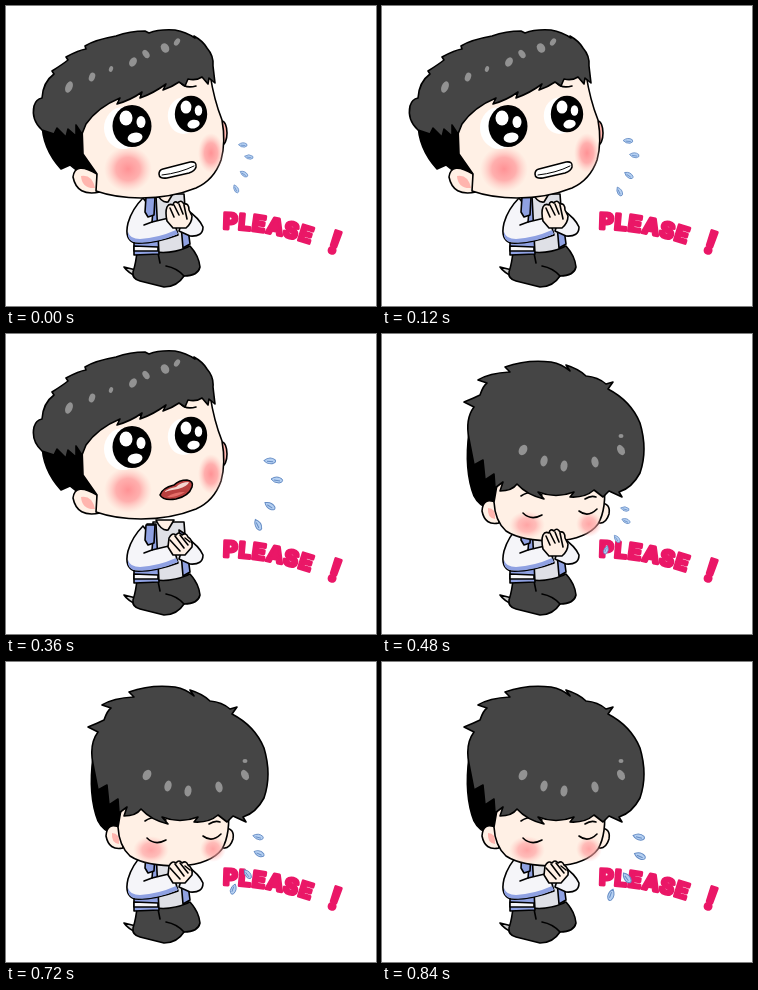
An HTML page that plays this animation: 370 by 300 pixels, repeating every 960 ms.

```html
<!DOCTYPE html>
<html lang="en">
<head>
<meta charset="utf-8">
<title>Please!</title>
<style>
  html, body { margin: 0; width: 100%; height: 100%; overflow: hidden; background: #fff; }
  svg { display: block; width: 100vw; height: 100vh; }
  .ink { stroke: #000; stroke-width: 1.6; stroke-linejoin: round; stroke-linecap: round; }
  .line { fill: none; }
  .skin { fill: #fff0e5; }
  .hair { fill: #454545; }
  .white { fill: #f5f5f9; }
  .blue { fill: #8fa1e2; }
  .shine { fill: #929292; }
  .drop { fill: #b5d0f2; stroke: #668dc5; stroke-width: 1; }
  text { font: 800 22px Inter, "Open Sans", sans-serif; fill: #ea1767; stroke: #ea1767; stroke-width: 3; stroke-linejoin: round; }
</style>
</head>
<body>
<svg viewBox="0 0 370 300">
  <defs>
    <radialGradient id="blush">
      <stop offset="0" stop-color="#ff9295"/>
      <stop offset=".5" stop-color="#ff9fa0" stop-opacity=".8"/>
      <stop offset="1" stop-color="#ffc4bd" stop-opacity="0"/>
    </radialGradient>
    <path id="baseline" d="M217 223Q266 223 318 243"/>
    <g id="eye">
      <ellipse cx="-9" cy="2" rx="19" ry="21" fill="#fff"/>
      <ellipse rx="19.5" ry="21"/>
      <g fill="#fff">
        <ellipse cx="-6" cy="-8" rx="6.5" ry="7.5"/>
        <ellipse cx="9" cy="-4" rx="4.5" ry="6"/>
        <ellipse cx="1" cy="12" rx="7.5" ry="5" transform="rotate(-10)"/>
      </g>
    </g>
  </defs>

  <g id="body" class="ink">
    <path fill="#ccc" d="M118 261L130 264L132 271Q122 267 118 261Z"/>
    <path class="hair" d="M131 245L184 240Q193 250 194 261Q192 270 178 270Q171 281 158 281L134 275Q126 273 127 266Q130 257 131 245Z"/>
    <path class="line" d="M178 270Q171 262 160 260M152 247L154 257"/>
    <path fill="#dfe0e6" d="M147 188H178L182 241Q166 248 150 246Z"/>
    <path class="skin" d="M150 186H168L162 196Q155 197 150 186Z"/>
    <path class="blue" d="M141 190L150 190L153 248L128 249L128 235L138 226Z"/>
    <path class="white" d="M128 240L152 241V245L128 245Z"/>
    <path class="blue" d="M173 196L179 200L184 238L177 242Z"/>
    <path class="white" d="M137 192Q126 203 122 217Q118 234 129 237Q148 238 172 229L167 211L146 216L147 205Z"/>
    <path class="blue" stroke="none" d="M122 226Q124 233 134 233Q152 232 170 224L172 228Q146 239 128 236Q121 234 122 226Z"/>
    <path class="blue" d="M140 191L149 191L148 209L142 211L139 206Z"/>
    <path class="white" d="M181 204Q193 212 197 221Q197 231 184 230L173 225L177 213Z"/>
    <path class="line" d="M146 216L138 219"/>
  </g>

  <g id="lookUp">
    <path class="ink" d="M36 114Q36 140 55 161L64 157L74 165L92 166L86 110Z"/>
    <ellipse class="ink" fill="#ffb5ae" cx="216" cy="125" rx="5" ry="12"/>
    <path class="ink skin" d="M91 166Q69 153 67 169Q71 189 94 184Z"/>
    <path fill="#ffb5ae" d="M89 180Q76 181 75 168Q86 166 89 180Z"/>
    <path class="ink skin" d="M76 118Q84 92 108 80L204 66Q208 92 216 112Q220 134 215 152Q208 172 190 180Q165 190 135 190Q110 190 90 183L91 166L77 146Z"/>
    <ellipse cx="122" cy="161" rx="24" ry="23" fill="url(#blush)"/>
    <ellipse cx="205" cy="145" rx="13" ry="20" fill="url(#blush)"/>
    <use href="#eye" x="126" y="118"/>
    <use href="#eye" transform="translate(185 106) scale(.83 .87)"/>
    <path class="ink line" d="M115 88Q124 90 128 83M174 74Q179 81 190 78"/>
    <path class="ink hair" d="M36 122Q25 112 28 98Q30 91 36 90Q37 74 48 66L46 63Q57 56 62 52L60 49Q73 42 80 41L79 38Q88 32 110 28Q124 23 139 23L143 25Q153 21 169 22Q180 24 189 30L188 28Q197 33 201 40Q208 48 207 58L209 75L203 70L202 76L196 69Q190 73 182 71L179 78L173 74Q166 79 157 82L160 76Q148 85 134 90L136 84Q125 92 111 96L114 90Q92 99 80 116L76 126L70 117L70 128L62 121L60 129L51 120L48 126Z"/>
    <g class="shine">
      <ellipse rx="3.5" ry="6" transform="translate(63 79) rotate(22)"/>
      <ellipse rx="3" ry="4.5" transform="translate(86 69) rotate(20)"/>
      <ellipse rx="2" ry="3" transform="translate(105 61) rotate(20)"/>
      <ellipse rx="3.5" ry="5" transform="translate(127 54) rotate(30)"/>
      <ellipse rx="3" ry="4.5" transform="translate(140 46) rotate(-35)"/>
      <ellipse rx="4" ry="5" transform="translate(159 40) rotate(-30)"/>
      <ellipse rx="2.5" ry="4" transform="translate(171 34) rotate(35)"/>
    </g>
    <g id="teeth" class="ink">
      <path fill="#fff" d="M157 161L184 154Q191 153 190 159Q189 163 183 165L161 170Q153 171 153 166Q153 162 157 161Z"/>
      <path class="line" stroke-width="1" d="M156 167Q174 165 188 158"/>
    </g>
    <g id="openMouth">
      <path class="ink" fill="#b9403f" d="M154 166Q156 159 168 156Q173 151 181 151Q188 152 186 158Q183 167 170 170Q157 172 154 166Z"/>
      <path fill="#f4d5cf" d="M158 163Q163 159 170 158Q175 153 183 153Q182 157 172 160Q165 161 158 163Z"/>
      <path fill="#e56e69" d="M161 168Q168 163 179 163Q170 169 161 168Z"/>
    </g>
  </g>

  <g id="bow">
    <path class="ink" d="M87 95Q82 133 92 159Q97 169 108 172L121 164L119 115Z"/>
    <path class="ink skin" d="M218 166Q229 166 227 177Q224 187 217 186Z"/>
    <path class="ink skin" d="M115 166Q101 159 100 174Q103 189 117 186Z"/>
    <path fill="#ffb5ae" d="M113 182Q105 181 106 171Q114 171 113 182Z"/>
    <path class="ink skin" d="M116 142H222Q225 172 216 187Q205 202 174 204Q139 204 124 194Q113 184 112 165Z"/>
    <ellipse cx="145" cy="188" rx="18" ry="14" fill="url(#blush)" opacity=".8"/>
    <ellipse cx="207" cy="187" rx="13" ry="13" fill="url(#blush)" opacity=".8"/>
    <path class="ink line" d="M141 176Q149 184 160 178M197 174Q206 181 215 172M139 159Q149 152 160 158M203 162Q209 158 214 160"/>
    <path class="ink hair" d="M87 102Q83 82 92 70L82 65Q92 61 98 58Q101 49 105 46L96 43Q107 36 128 35L123 30Q145 22 169 25Q180 27 188 34L184 28Q197 32 204 39Q216 40 224 47L231 45L226 52Q249 64 258 86Q266 113 258 136Q250 151 237 155L240 160L227 154L221 160L212 153Q203 161 188 160L192 155Q174 162 156 155L162 162Q145 158 135 147Q130 154 118 154L121 145L113 151L112 137L103 143L101 123L92 128Z"/>
    <g class="shine">
      <ellipse rx="4" ry="5.5" transform="translate(141 113) rotate(30)"/>
      <ellipse rx="3.5" ry="5.5" transform="translate(162 124) rotate(15)"/>
      <ellipse rx="3.5" ry="5.5" transform="translate(182 129) rotate(8)"/>
      <ellipse rx="3.5" ry="5.5" transform="translate(213 125) rotate(-15)"/>
      <ellipse rx="3.5" ry="5.5" transform="translate(239 113) rotate(-28)"/>
      <ellipse rx="2.5" ry="2" transform="translate(239 99)"/>
    </g>
  </g>

  <g id="pray" class="ink skin">
    <path d="M161 215Q159 206 161 201Q163 197 167 199Q168 194 172 197Q175 193 178 198Q183 197 183 204L186 210Q186 217 180 222L167 222Z"/>
    <path class="line" d="M164 202L168 211M168 199L173 209M173 198L177 208M178 199L181 213"/>
  </g>
  <g id="clasp" class="ink skin">
    <path d="M162 213L163 204Q166 198 170 201Q173 197 176 201Q180 198 182 203Q187 206 186 213L179 221L167 221Z"/>
    <path class="line" d="M164 206L174 217M169 202L178 214M174 201L182 211M179 204L184 208"/>
  </g>

  <text letter-spacing=".8"><textPath href="#baseline">PLEASE</textPath></text>
  <text font-size="32" transform="translate(320 245) rotate(19)" style="font-size:31px">!</text>
  <g id="drops"></g>
</svg>
<script>
const STEP = 120, STEPS = 8;
const $ = id => document.getElementById(id);

// Each drop: start x, y, end x, y and tilt.
const upDrops = [[237, 139, 264, 127, -5], [243, 151, 271, 146, 0], [238, 168, 264, 172, 25], [230, 183, 252, 191, 55]];
const bowDrops = [[243, 175, 257, 175, 5], [244, 187, 258, 194, 15], [235, 205, 245, 216, 45], [224, 216, 229, 233, 100]];
const travel = [0, .34, .66, 1];
const upShift = [2, 2, 0, -5], bowShift = [3, 3, 0, 0];

const mix = (a, b, t) => a + (b - a) * t;
const show = (id, on) => $(id).style.display = on ? "" : "none";

function drawDrop([x0, y0, x1, y1, tilt], phase) {
  const x = mix(x0, x1, travel[phase]), y = mix(y0, y1, travel[phase]);
  const size = mix(.75, 1, travel[phase]);
  return `<path class="drop" d="M-6 -1Q0 -5 5 -1Q7 2 2 3Q-3 3 -6 -1ZM-3 0L3 1"
    transform="translate(${x} ${y}) rotate(${tilt}) scale(${size})"/>`;
}

let lastStep = -1;
function draw(time) {
  const step = Math.floor(time / STEP) % STEPS;
  if (step === lastStep) return;
  lastStep = step;
  const phase = step % 4, bowed = step >= 4, tight = phase < 2;
  show("lookUp", !bowed);
  show("bow", bowed);
  show("teeth", tight);
  show("openMouth", !tight);
  show("pray", tight);
  show("clasp", !tight);
  $("lookUp").setAttribute("transform", `translate(0 ${upShift[phase]})`);
  $("bow").setAttribute("transform", `translate(0 ${bowShift[phase]})`);
  $("drops").innerHTML = (bowed ? bowDrops : upDrops).map(drop => drawDrop(drop, phase)).join("");
}

const start = performance.now();
function tick() {
  draw(performance.now() - start);
  requestAnimationFrame(tick);
}
tick();
</script>
</body>
</html>
```
